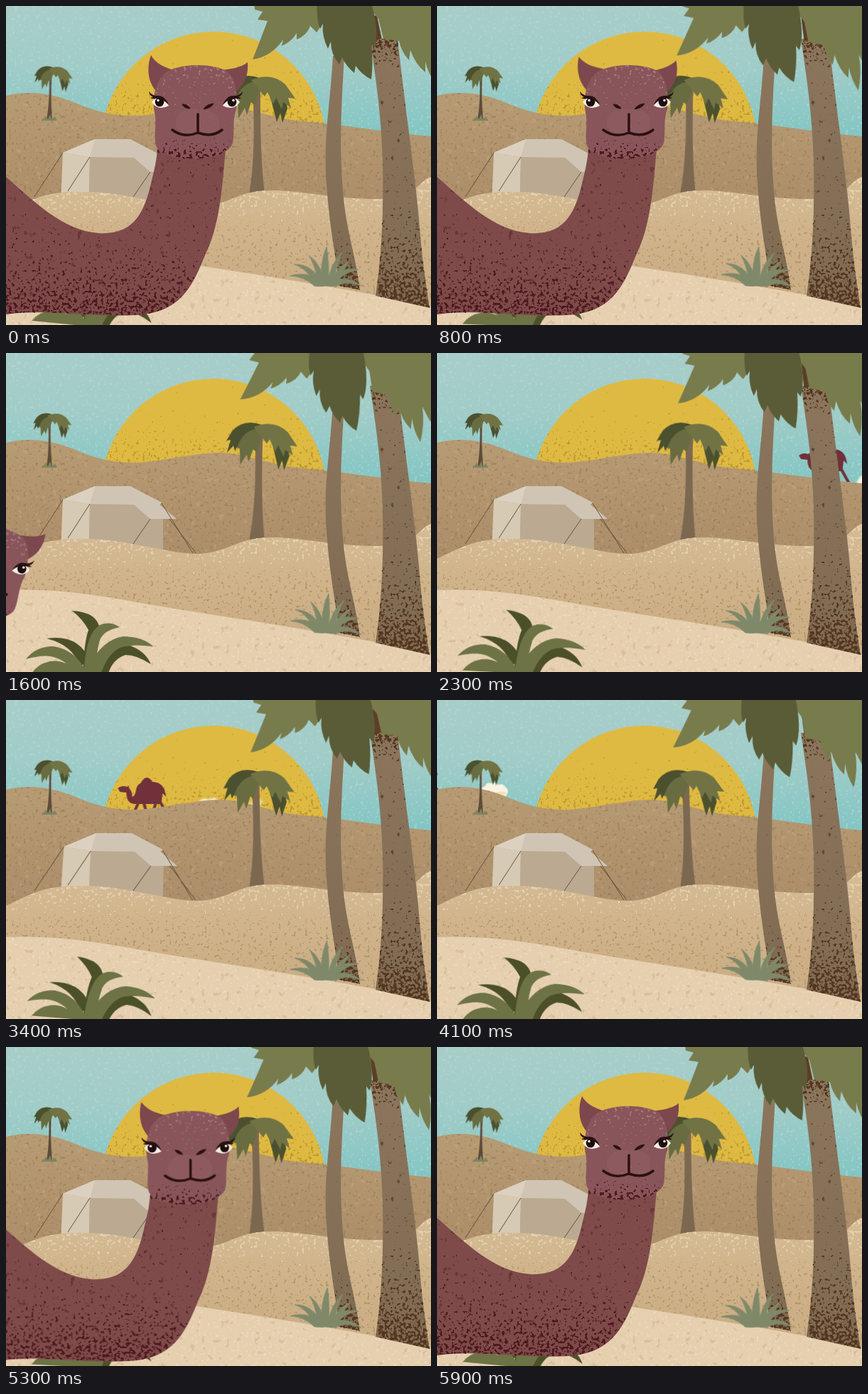
Animation, 598 px wide and 448 px high, one loop 6 s. Source, as an HTML page without scripts:

```html
<!DOCTYPE html>
<html lang="en">
<head>
<meta charset="utf-8">
<title>Desert camel</title>
<style>
  html, body { margin: 0; width: 100%; height: 100%; overflow: hidden; background: #a8cfcb; }
  body { position: relative; }
  svg { position: absolute; left: 0; top: 0; width: 598px; height: 448px; }
  .speck { filter: url(#speck); }
  .blotch { filter: url(#blotch); }

  .sway { animation: sway 1.5s cubic-bezier(.37,0,.63,1) infinite alternate; }
  .crown { --to: 5.7deg; transform-origin: 440px -106px; }
  .tiny { --from: .6deg; --to: -.8deg; transform-origin: 61px 160px; }
  .agave { --from: 5.5deg; transform-origin: 118px 448px; }
  .grass { --from: -1deg; --to: 2deg; transform-origin: 452px 392px; }
  .lean { transform-origin: 353px 262px; animation: lean 3s cubic-bezier(.37,0,.63,1) -1.5s infinite alternate; }
  .tent { transform-origin: 150px 265px; animation: gust 6s ease-in-out infinite; }
  .runner { animation: run 6s linear infinite; }
  .dust { transform-origin: 449px 145px; animation: settle 6s linear infinite; }
  .streak { animation: fade 6s linear infinite; }
  .camel { overflow: visible; will-change: transform; transform-origin: 318px 134px; animation: visit 6s linear infinite; }
  .ear { animation: ear 6s ease-in-out infinite; }
  .ear.l { transform-origin: 219px 106px; }
  .ear.r { transform-origin: 317px 106px; }

  @keyframes sway { from { transform: rotate(var(--from, 0deg)); } to { transform: rotate(var(--to, 0deg)); } }
  @keyframes lean { from { transform: rotate(-1.3deg); } to { transform: rotate(1.3deg); } }
  @keyframes fade { 0%, 52% { opacity: .85; } 64%, 100% { opacity: 0; } }
  @keyframes gust {
    0%, 42% { transform: none; }
    50% { transform: skewX(4.3deg); }
    56% { transform: skewX(-1.5deg); }
    62%, 100% { transform: none; }
  }
  @keyframes run {
    0%, 33.3% { transform: translate(330px, 38px); }
    40% { transform: translate(191px, 30px); }
    45% { transform: translate(95px, 18px); }
    50% { transform: none; }
    56.7% { transform: translate(-127px, 12px); }
    61.7% { transform: translate(-223px, -8px); }
    68.3% { transform: translate(-350px, -18px); }
    76.7%, 100% { transform: translate(-510px, -18px); }
  }
  @keyframes settle {
    0%, 50% { transform: none; }
    68.3% { transform: scale(.47); }
    75%, 100% { transform: scale(0); }
  }
  @keyframes visit {
    0%, 18% { transform: none; animation-timing-function: ease-in; }
    26.67% { transform: translate(-295px, 168px) rotate(11deg); }
    31%, 75.5% { transform: translate(-460px, 280px) rotate(11deg); }
    75.6% { transform: translate(-420px, 260px) rotate(-2deg); }
    83.33% { transform: translate(-114px, 71px) rotate(-2deg); animation-timing-function: ease-out; }
    90%, 100% { transform: none; }
  }
  @keyframes ear {
    0%, 5%, 95%, 100% { transform: none; }
    13.3%, 83.3% { transform: rotate(-7deg); }
    26.7% { transform: rotate(3deg); }
  }
</style>
</head>
<body>

<!-- Sky, sun and shared definitions -->
<svg viewBox="0 0 598 448">
  <defs>
    <filter id="speck" color-interpolation-filters="sRGB">
      <feTurbulence type="fractalNoise" baseFrequency=".24" numOctaves="2" seed="4"/>
      <feColorMatrix values="0 0 0 0 0  0 0 0 0 0  0 0 0 0 0  1 0 0 0 0" result="noise"/>
      <feComposite in="SourceAlpha" in2="noise" operator="arithmetic" k2=".5" k3="1"/>
      <feComponentTransfer result="mask"><feFuncA type="linear" slope="14" intercept="-12"/></feComponentTransfer>
      <feComponentTransfer in="SourceGraphic"><feFuncA type="linear" slope="255"/></feComponentTransfer>
      <feComposite in2="mask" operator="in"/>
    </filter>
    <filter id="blotch" color-interpolation-filters="sRGB">
      <feTurbulence type="fractalNoise" baseFrequency=".12" numOctaves="2" seed="9"/>
      <feColorMatrix values="0 0 0 0 0  0 0 0 0 0  0 0 0 0 0  1 0 0 0 0" result="noise"/>
      <feComposite in="SourceAlpha" in2="noise" operator="arithmetic" k2=".5" k3="1"/>
      <feComponentTransfer result="mask"><feFuncA type="linear" slope="18" intercept="-15.7"/></feComponentTransfer>
      <feComponentTransfer in="SourceGraphic"><feFuncA type="linear" slope="255"/></feComponentTransfer>
      <feComposite in2="mask" operator="in"/>
    </filter>
    <filter id="soft"><feGaussianBlur stdDeviation="1.2"/></filter>

    <linearGradient id="sky" x2="0" y2="1"><stop stop-color="#a8cdc9"/><stop offset=".45" stop-color="#a0ccc8"/><stop offset="1" stop-color="#80c5c3"/></linearGradient>
    <linearGradient id="sunSpeck" x2="0" y2="1"><stop offset=".1" stop-color="#b58e2a" stop-opacity=".1"/><stop offset=".36" stop-color="#b58e2a" stop-opacity=".58"/></linearGradient>
    <linearGradient id="far" x2="0" y2="1"><stop stop-color="#b69b73"/><stop offset="1" stop-color="#ab8d69"/></linearGradient>
    <linearGradient id="mid" x2="0" y2="1"><stop stop-color="#d5bb94"/><stop offset=".6" stop-color="#ccaf86"/></linearGradient>
    <linearGradient id="lightTop" x2="0" y2="1"><stop stop-color="#ead8ba" stop-opacity=".72"/><stop offset=".26" stop-color="#ead8ba" stop-opacity=".42"/><stop offset=".45" stop-color="#ead8ba" stop-opacity=".1"/></linearGradient>
    <linearGradient id="trunk" x2="0" y2="1"><stop stop-color="#8b765d"/><stop offset="1" stop-color="#7f6a52"/></linearGradient>
    <linearGradient id="trunkSpeck" x2="0" y2="1"><stop stop-color="#55361f" stop-opacity=".85"/><stop offset=".14" stop-color="#55361f" stop-opacity=".2"/><stop offset=".6" stop-color="#55361f" stop-opacity=".25"/><stop offset="1" stop-color="#55361f" stop-opacity=".88"/></linearGradient>
    <linearGradient id="rootSpeck" x2="0" y2="1"><stop offset=".72" stop-color="#55361f" stop-opacity=".1"/><stop offset="1" stop-color="#55361f" stop-opacity=".88"/></linearGradient>
    <linearGradient id="bodySpeck" x2="0" y2="1"><stop stop-color="#4d191c" stop-opacity=".7"/><stop offset=".15" stop-color="#4d191c" stop-opacity=".2"/><stop offset=".6" stop-color="#4d191c" stop-opacity=".3"/><stop offset=".97" stop-color="#4d191c" stop-opacity=".72"/></linearGradient>
    <linearGradient id="chinSpeck" x2="0" y2="1"><stop offset=".72" stop-color="#4d191c" stop-opacity=".1"/><stop offset="1" stop-color="#4d191c" stop-opacity=".78"/></linearGradient>
    <linearGradient id="browSpeck" x2="0" y2="1"><stop stop-color="#b3878a" stop-opacity=".55"/><stop offset=".5" stop-color="#b3878a" stop-opacity=".2"/></linearGradient>

    <path id="farDune" d="M0 126C30 118 65 122 95 135S150 154 180 154S260 141 298 140S370 158 420 162S530 177 598 183V300H0Z"/>
    <path id="midDune" d="M0 289C30 275 50 262 95 261S170 266 215 275S275 284 300 277S335 259 375 259S470 272 525 271S580 245 598 240V448H0Z"/>
    <path id="nearDune" d="M0 333C70 330 130 340 190 351S330 373 400 385S540 408 598 424V448H0Z"/>
    <path id="slimTrunk" d="M460 70C456 140 446 190 451 250C455 310 464 350 469 393L498 399C492 350 480 320 475 270C468 200 472 140 476 70Z"/>
    <path id="wideTrunk" d="M512 46H551C560 130 575 230 581 300S590 380 596 424L520 407C530 340 531 280 530 220C528 150 520 100 512 46Z"/>
    <path id="neck" d="M-60 190L0 240C40 275 80 315 130 319C180 322 195 290 205 245C210 225 212 215 213 200H309C304 260 300 310 280 350C262 395 245 430 185 434C120 438 60 425 0 433H-60Z"/>
    <path id="head" d="M226 92C250 80 290 80 312 92C324 104 326 125 324 145C318 160 322 180 319 192C312 220 220 222 211 196C207 180 213 165 209 150C205 130 210 104 226 92Z"/>
    <g id="fronds">
      <g fill="#4b512f">
        <path d="M4-9Q-22-18-38 0L-46 14L-40 13L-45 31L-36 21L-34 28Q-24 10 0 4Z"/>
        <path d="M2 0Q18 6 20 22L28 53L33 40L36 54L43 34Q40 10 20-4Z"/>
      </g>
      <path d="M2-4Q-22-4-31 24L-27 25L-26 48L-17 33L-14 43L-8 25L-4 29Q2 12 6 2Z" fill="#686c40"/>
      <path d="M-8-6Q20-18 40 0L54 20L44 19L48 33L37 25L35 35L27 19L23 28L15 11L11 17L0 4Z" fill="#717345"/>
    </g>
  </defs>
  <rect width="598" height="190" fill="url(#sky)"/>
  <rect width="598" height="190" fill="#bad7d1" fill-opacity=".46" class="speck" opacity=".55"/>
  <circle cx="292" cy="194.500" r="158.500" fill="#dfba42"/>
  <circle cx="292" cy="194.500" r="158.500" fill="url(#sunSpeck)" class="speck" opacity=".7"/>
</svg>

<!-- Distant runner -->
<svg viewBox="0 0 598 448">
  <g class="runner">
    <g class="dust" filter="url(#soft)">
      <path class="streak" d="M425 147Q455 141 477 128Q494 120 498 127Q494 135 470 144Q445 158 425 160Z" fill="#e3efe8"/>
      <path d="M362 158Q368 138 384 132Q390 118 402 124Q414 116 422 128Q440 122 446 136Q458 142 448 160Q440 172 400 172H362Z" fill="#f8f3e3"/>
      <path d="M400 158Q425 143 446 151L442 166H400Z" fill="#eed592" opacity=".6"/>
    </g>
    <g fill="#70313a">
      <path d="M284 112Q289 107 297 110L299 108L300 112Q305 118 304 124C312 122 307 108 316 105Q324 90 333 103C347 104 350 112 352 124L347 119L345 134H310Q296 135 296 118L287 117Z"/>
      <path d="M314 130L304 152M320 130L326 152M338 130L332 152M343 130L354 150" stroke="#70313a" stroke-width="4"/>
    </g>
  </g>
</svg>

<!-- Far dune -->
<svg viewBox="0 0 598 448">
  <use href="#farDune" fill="url(#far)"/>
  <use href="#farDune" fill="#96744f" fill-opacity=".45" class="speck" opacity=".5"/>
  <use href="#farDune" fill="#c9ab82" fill-opacity=".4" class="blotch" opacity=".4"/>
</svg>

<!-- Tent and small palms -->
<svg viewBox="0 0 598 448">
  <g class="tiny sway">
    <path d="M60 95Q62 130 57 161H65Q62 130 64 95Z" fill="#5d4b39"/>
    <use href="#fronds" transform="translate(64 91) scale(.54)"/>
  </g>
  <path d="M51 161L56 154L59 159L62 152L64 159L69 155L72 161Z" fill="#7d8560"/>
  <g class="tent">
    <path d="M80 206L118 212L117 275H77Z" fill="#d6cab4"/>
    <path d="M118 212H180L203 232H221V285H117Z" fill="#bbaa91"/>
    <path d="M80 206L125 187H175L219 210L216 213L240 233H203L180 213L118 212Z" fill="#d0c5b5"/>
    <path d="M80 206L125 187L118 212Z" fill="#dcd1c1"/>
    <path d="M80 206L40 268M118 212L87 260M203 233L179 268M219 211L263 281M230 233L267 281" fill="none" stroke="#66533d"/>
  </g>
  <g class="lean">
    <path d="M347 112Q352 210 342 264H364Q357 210 358 112Z" fill="#7c6850"/>
    <use href="#fronds" transform="translate(353 110)"/>
  </g>
</svg>

<!-- Near dunes and trunks -->
<svg viewBox="0 0 598 448">
  <use href="#midDune" fill="url(#mid)"/>
  <use href="#midDune" fill="#a98258" fill-opacity=".45" class="speck" opacity=".6"/>
  <use href="#midDune" fill="url(#lightTop)" class="speck" opacity=".85"/>
  <use href="#nearDune" fill="#e5cfaf"/>
  <use href="#nearDune" fill="#cfb189" fill-opacity=".4" class="blotch" opacity=".5"/>
  <use href="#nearDune" fill="#f0e0c6" fill-opacity=".45" class="speck" opacity=".6"/>
  <use href="#slimTrunk" fill="url(#trunk)"/>
  <use href="#slimTrunk" fill="url(#rootSpeck)" class="speck"/>
  <path d="M512 12L522 14L530 52H517Z" fill="#5f3d25"/>
  <use href="#wideTrunk" fill="url(#trunk)"/>
  <use href="#wideTrunk" fill="url(#trunkSpeck)" class="speck"/>
  <use href="#wideTrunk" fill="#5c4029" fill-opacity=".3" class="blotch" opacity=".8"/>
</svg>

<!-- Foreground leaves -->
<svg viewBox="0 0 598 448">
  <g class="crown sway">
    <path d="M500-60V-10L524 18L531 46L553 49Q556 64 567 76L569 62Q576 82 590 93L590 78Q594 95 605 110Q609 85 603 60L616 80Q640 40 650-60Z" fill="#787b4c"/>
    <path d="M345-60L350 5L361 8L354 19L368 21Q357 50 347 75Q374 71 390 47L388 56Q402 50 409 38L409 47Q424 41 428 28L437 37Q446 26 456-10V-60Z" fill="#787b4c"/>
    <path d="M444-60Q432 10 442 32L446 25Q444 42 453 60L457 50Q457 68 469 82L473 72Q478 84 490 94L492 84Q501 97 514 103Q517 80 514 52L519 58Q526 34 512-10V-60Z" fill="#595c36"/>
  </g>
  <g class="grass sway" fill="#7f896a" stroke="#7f896a" stroke-linejoin="round">
    <path d="M444 393Q442 360 452 338Q456 364 453 393ZM440 393Q436 364 427 350Q446 364 448 393ZM452 393Q456 362 474 346Q464 368 460 393ZM436 393Q424 367 406 362Q434 362 446 393ZM434 393Q420 379 400 378Q428 370 446 393ZM454 393Q464 365 496 371Q472 374 462 393ZM454 393Q474 374 500 394Q478 385 464 394ZM456 393Q464 368 484 358Q470 376 462 393Z"/>
  </g>
  <g class="agave sway">
    <g fill="#4c5029">
      <path d="M108 450Q110 405 116 389Q108 374 93 362Q129 364 132 388Q128 420 124 450Z"/>
      <path d="M104 440Q94 410 57 401Q102 394 118 432Z"/>
      <path d="M128 450Q142 412 172 410Q196 418 204 437Q184 424 168 424Q150 430 144 450Z"/>
    </g>
    <g fill="#6d7345">
      <path d="M116 440Q136 402 165 398Q192 398 207 412Q176 408 160 414Q142 424 134 450H112Z"/>
      <path d="M110 440Q114 392 132 382Q146 376 160 385Q138 389 132 403Q126 424 126 450H108Z"/>
      <path d="M114 450Q98 416 66 412Q42 412 28 430Q56 422 70 428Q88 434 94 450Z"/>
      <path d="M104 450Q84 430 62 433Q44 437 36 450Z"/>
    </g>
  </g>
</svg>

<!-- Curious camel -->
<svg class="camel" viewBox="0 0 598 448">
  <path class="ear l" d="M204 69C210 80 222 86 236 90L214 122C200 110 197 88 204 69Z" fill="#7d474e"/>
  <path class="ear r" d="M340 79C330 87 318 88 304 90L324 120C338 108 341 95 340 79Z" fill="#7d474e"/>
  <use href="#neck" fill="#7e4a4a"/>
  <use href="#neck" fill="#a06c6c" fill-opacity=".3" class="speck" opacity=".6"/>
  <use href="#neck" fill="#632f32" fill-opacity=".36" class="blotch" opacity=".7"/>
  <use href="#neck" fill="url(#bodySpeck)" class="speck"/>
  <use href="#head" fill="#88555a"/>
  <use href="#head" fill="url(#browSpeck)" class="speck" opacity=".7"/>
  <use href="#head" fill="url(#chinSpeck)" class="speck"/>
  <path d="M240 172Q234 148 260 145H279Q306 148 299 174Q286 184 270 178Q254 184 240 172Z" fill="#95626a" opacity=".4"/>
  <g id="eye">
    <path d="M205 135Q212 124 224 130L229 140Q214 148 205 135Z" fill="#f4eee6"/>
    <circle cx="216" cy="135" r="6.3" fill="#1d0d0e"/>
    <circle cx="214" cy="132.500" r="1.700" fill="#fff"/>
    <path d="M201 120Q206 126 212 126Q224 125 229 139Q220 129 211 130Q206 131 203 129L207 128Q202 126 201 120Z" fill="#2a1113"/>
  </g>
  <use href="#eye" transform="translate(534) scale(-1 1)"/>
  <path d="M248 138Q251 144 259 144Q256 138 248 138ZM292 137Q289 143 278 145Q282 138 292 137Z" fill="#2a1113" stroke="#2a1113"/>
  <path d="M270 152V178M234 174Q250 186 270 178Q290 185 304 174" fill="none" stroke="#2a1113" stroke-width="3.5" stroke-linecap="round"/>
</svg>
</body>
</html>
```
